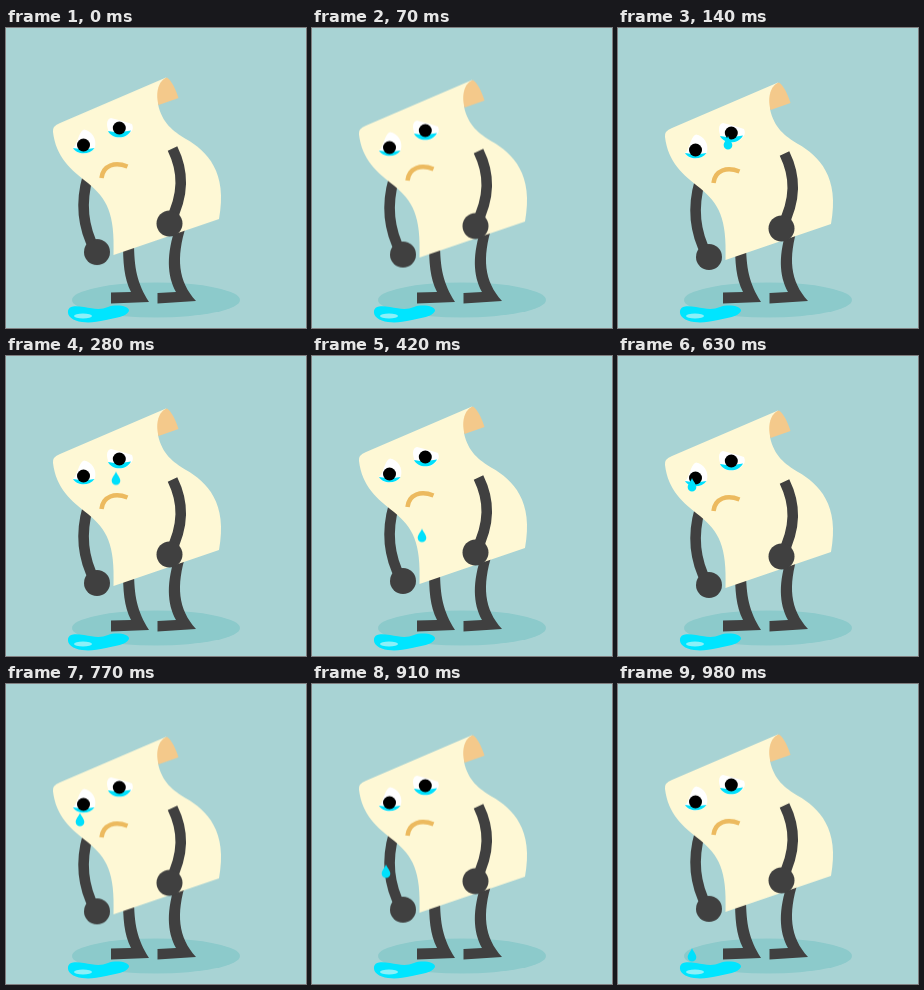
Recreate the animation shown at these times as an HTML page without scripts. Size 300 px wide and 300 px high, loop 1050 ms.

```html
<!DOCTYPE html>
<html lang="en">
<head>
<meta charset="utf-8">
<title>Sad paper</title>
<style>
  html, body { margin: 0; width: 100%; height: 100%; overflow: hidden; background: #a8d3d4; }
  svg { display: block; width: 100%; height: 100%; }
  .limb { fill: none; stroke: #404040; stroke-width: 10.6; }
  .dark { fill: #404040; }
  .tear { fill: #00e0fc; }

  /* two sobs per loop: a quick dip, then a slow rise */
  .body { animation: sob 1.05s linear infinite; }
  @keyframes sob {
    0%, 46.667%, 100% { transform: translateY(0); }
    13.333%, 60% { transform: translateY(5px); }
  }

  /* each tear swells, drops into the puddle and vanishes */
  .fall { opacity: 0; animation: fall 1.05s cubic-bezier(.35, 0, .8, 0) var(--at) infinite; }
  .right { --at: .14s; --from: translate(110px, 115px); --to: translate(110px, 272px); }
  .left { --at: .63s; --from: translate(74px, 129px); --to: translate(74px, 271px); }
  @keyframes fall {
    0% { opacity: 1; transform: var(--from); }
    33.333%, 39.9% { opacity: 1; transform: var(--to); }
    40%, 100% { opacity: 0; transform: var(--to); }
  }
</style>
</head>
<body>
<svg viewBox="0 0 300 300">
  <defs>
    <path id="drop" class="tear" d="M0-7C1-4 4.300-1 4.300 2.300A4.300 4.300 0 0 1-4.300 2.300C-4.300-1-1-4 0-7Z"/>
  </defs>

  <ellipse cx="150" cy="272" rx="84" ry="17.500" fill="#8ccacb"/>
  <path fill="#00e5ff" d="M62 283C63 277 71 278 78 279C88 281 95 282 102 279C110 276 124 278 123 283C120 289 109 290 100 292C90 294 84 295 76 294C67 293 61 288 62 283Z"/>
  <ellipse cx="77" cy="288" rx="9" ry="2.600" fill="#8cf0f8"/>

  <!-- legs -->
  <path class="dark" d="M117 213C117 235 118 250 125 264L105 264.500V275.500L143 274C131 255 128 240 128 213Z"/>
  <path class="dark" d="M170 198C160 226 161 248 170 264L151.500 265V275.500L190 273C172 253 170 230 180 198Z"/>

  <g class="body">
    <path class="limb" d="M82 148C75 172 75 196 89 222"/>
    <circle class="dark" cx="91" cy="224" r="13"/>

    <!-- sheet -->
    <path fill="#fef8d5" d="M54 95L160 49.500L152 76C156 95 167 103 180 111C201 123 222 144 213 191L107.500 227C109 185 101 171 82 155C65 142 50 129 47 104Q46 98 54 95Z"/>
    <path fill="#f4c98b" d="M152.500 77C149 64 153 52 161 49.500C166 53 170 62 172.500 70Z"/>

    <!-- eyes -->
    <path fill="#fff" d="M67 120C72 116 72 104 78 101.500C86 103 91 111 89 119C85 127 71 128 67 120Z"/>
    <path class="tear" d="M67 120Q78 122 88.500 120C84 127 71 127 67 120Z"/>
    <circle cx="77.500" cy="117" r="6.500"/>
    <path fill="#fff" d="M102 102C100 95 101 91 105 90C113 92 120 94 126 96C128 101 126 103 124 105C118 112 105 111 102 102Z"/>
    <path class="tear" d="M102 103Q113 105 125 102.500C120 112 106 111 102 103Z"/>
    <circle cx="113.300" cy="100" r="6.500"/>

    <path fill="none" stroke="#ecba5f" stroke-width="4.500" d="M95.500 150C97 137 109 133.500 121.500 138.500"/>

    <path class="limb" d="M166.500 120.500C177.500 143 178.500 166 163.500 195"/>
    <circle class="dark" cx="163.500" cy="195.500" r="13"/>
  </g>

  <use class="fall right" href="#drop"/>
  <use class="fall left" href="#drop"/>
</svg>
</body>
</html>
```
